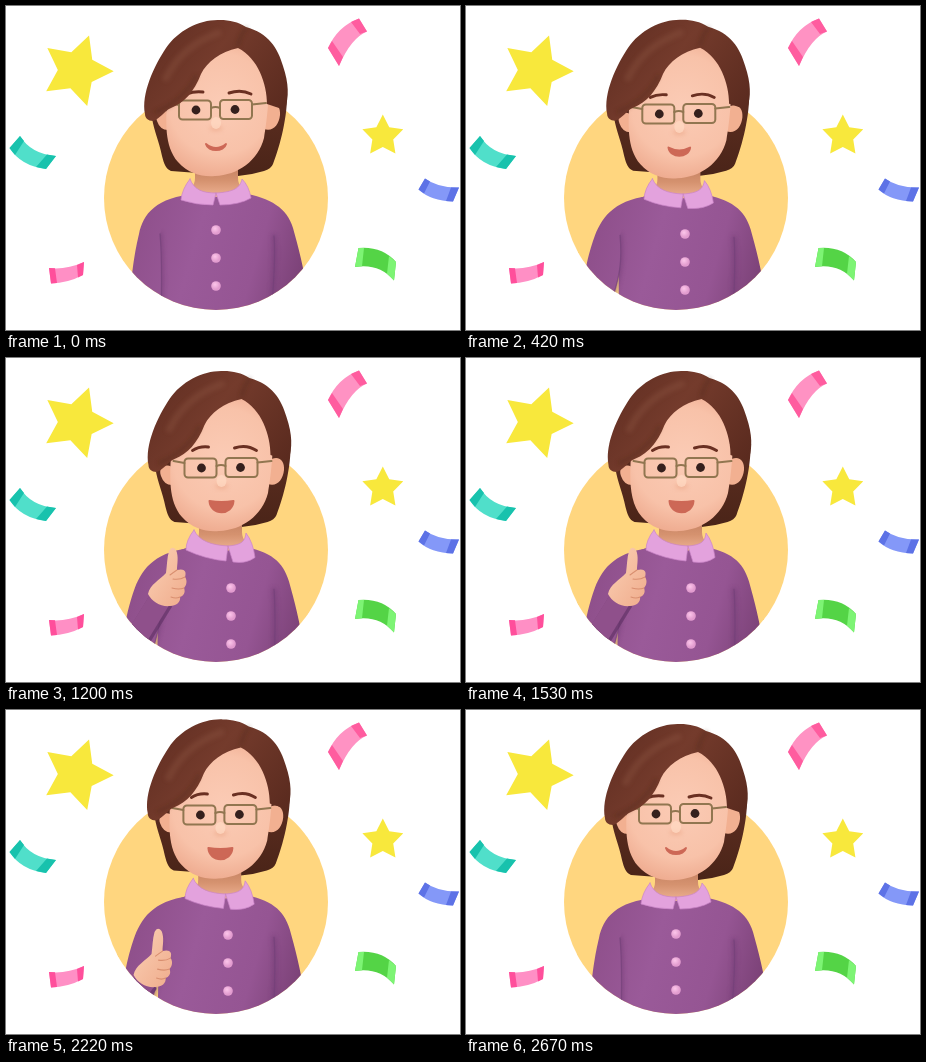
Write an HTML page that moves like this. It is 454 px wide and 324 px high and loops after 2700 ms.

```html
<!DOCTYPE html>
<html lang="en">
<head>
<meta charset="utf-8">
<title>Thumbs up</title>
<style>
  html, body { margin: 0; width: 100%; height: 100%; overflow: hidden; background: #fff; }
  svg { display: block; width: 100vw; height: 100vh; }
</style>
</head>
<body>
<svg viewBox="0 0 454 324" fill="none" stroke-linecap="round" stroke-linejoin="round">
  <defs>
    <clipPath id="disc"><circle cx="210" cy="192" r="112"/></clipPath>
    <filter id="soft" x="-50%" y="-50%" width="200%" height="200%"><feGaussianBlur stdDeviation="2.2"/></filter>
    <linearGradient id="shirt" gradientUnits="userSpaceOnUse" x1="125" y1="200" x2="298" y2="250">
      <stop stop-color="#8d4e89"/><stop offset=".4" stop-color="#9a5a99"/><stop offset=".75" stop-color="#955593"/><stop offset="1" stop-color="#7d4379"/>
    </linearGradient>
    <linearGradient id="hair" gradientUnits="userSpaceOnUse" x1="165" y1="30" x2="270" y2="110">
      <stop stop-color="#673225"/><stop offset=".35" stop-color="#743b2c"/><stop offset="1" stop-color="#5b2b1f"/>
    </linearGradient>
    <linearGradient id="backHair" x2="0" y2="1">
      <stop stop-color="#653224"/><stop offset="1" stop-color="#4a2418"/>
    </linearGradient>
    <radialGradient id="skin" gradientUnits="userSpaceOnUse" cx="214" cy="98" r="78">
      <stop stop-color="#fbcbb5"/><stop offset=".65" stop-color="#f8c2a9"/><stop offset="1" stop-color="#eda88c"/>
    </radialGradient>
    <linearGradient id="neckSkin" x2="0" y2="1">
      <stop stop-color="#b9765a"/><stop offset=".6" stop-color="#d5926f"/><stop offset="1" stop-color="#eeb293"/>
    </linearGradient>
    <linearGradient id="handSkin" x2="1" y2="1">
      <stop stop-color="#fbd0b5"/><stop offset="1" stop-color="#efac8c"/>
    </linearGradient>
    <radialGradient id="button" cx=".4" cy=".35">
      <stop stop-color="#fcc6ea"/><stop offset="1" stop-color="#e29ccf"/>
    </radialGradient>
  </defs>

  <g id="confetti"></g>
  <circle cx="210" cy="192" r="112" fill="#ffd67f"/>

  <g id="hairBack">
    <path fill="url(#backHair)" d="M150 90L262 60 281 85C282 110 274 140 267 158Q265 163 258 165 245 169 232 170L165 165C160 163 158 158 156 150 153 135 148 125 146 112Z"/>
  </g>

  <g clip-path="url(#disc)">
    <g id="body">
      <path id="torso" fill="url(#shirt)"/>
      <path id="armShade" stroke="#6f3a73" stroke-width="4" opacity=".55" filter="url(#soft)"/>
      <path id="arm" fill="url(#shirt)"/>
      <path id="crease" stroke="#74407a" stroke-width="1.3" opacity=".7"/>
    </g>
    <path id="neck" fill="url(#neckSkin)" d="M189 150H232V172Q232 178 236 182 228 191 211 191 194 191 185 182 189 178 189 172Z"/>
    <path id="collar" fill="#e3a2dd" stroke="#cb85c7" stroke-width=".7"/>
    <g id="buttons" fill="url(#button)">
      <circle cx="210" cy="224" r="4.8"/><circle cx="210" cy="252" r="4.8"/><circle cx="210" cy="280" r="4.8"/>
    </g>
    <path id="forearmShade" stroke="#633267" stroke-width="25" stroke-linecap="butt" opacity=".7"/>
    <path id="forearm" stroke="#8f508b" stroke-width="22" stroke-linecap="butt"/>
    <g id="hand">
      <path fill="url(#handSkin)" d="M160 215C161 207 161 200 163 193Q166 187 170 192C173 199 171 206 171 212 178 210 181 213 179 219 182 223 180 228 178 230 180 235 177 238 174 239 175 244 170 248 164 248 155 249 146 244 142 236 144 226 154 222 160 215Z"/>
      <path stroke="#d98f70" stroke-width="1.1" d="M164 217Q168 214 171 212M167 221Q174 222 179 219M166 230Q173 232 178 230M165 239Q170 241 174 239"/>
    </g>
  </g>

  <g id="face">
    <path fill="#f2b091" d="M162 106C154 102 148 107 151 115Q154 124 162 124ZM258 100C268 93 275 99 274 109 273 119 267 126 258 123Z"/>
    <path fill="url(#skin)" d="M161 92C160 115 158 140 172 156 183 168 196 171 209 170 232 169 252 155 258 132 261 115 265 80 262 55L240 30 215 35 185 60Z"/>
  </g>
  <g id="features">
    <path fill="#e9a282" opacity=".5" filter="url(#soft)" d="M203 123Q210 128 217 123L215 120H205Z"/>
    <ellipse cx="210" cy="117" rx="5" ry="6" fill="#ffd9c3" opacity=".75"/>
    <g fill="#35201d"><circle cx="190" cy="104" r="4.4"/><circle cx="229" cy="103.5" r="4.4"/></g>
    <path id="brows" stroke="#6a3022" stroke-width="2.9"/>
    <g stroke="#917650" stroke-width="2">
      <rect x="173" y="94.5" width="32" height="19" rx="3.5"/><rect x="214" y="94" width="32" height="19" rx="3.5"/>
      <path d="M205 102Q209.500 100 214 102M173 99L162 97M246 98.500L260 97"/>
    </g>
    <path id="mouth" fill="#cd6856" stroke="#cd6856" stroke-width="2"/>
  </g>
  <g id="hairFront">
    <path fill="url(#hair)" d="M139 108C135 88 148 60 160 42 172 24 195 13 214 14 224 14 232 16 240 21 262 27 272 42 277 60 283 78 283 90 279 104L261 98C261 78 252 52 232 42 214 46 201 56 195 68 188 86 178 97 165 102 158 105 154 113 147 115 142 115 139 112 139 108Z"/>
    <path stroke="#8a5240" stroke-width="7" opacity=".4" filter="url(#soft)" d="M160 72Q176 40 212 27"/>
    <path stroke="#4c2519" stroke-width="3" opacity=".4" filter="url(#soft)" d="M232 39Q235 28 240 22M150 106Q178 94 190 70"/>
  </g>
</svg>

<script>
const LOOP = 2700, STEP = 30;
const el = id => document.getElementById(id);
const draw = (id, d) => el(id).setAttribute('d', d);
const move = (id, x, y) => el(id).setAttribute('transform', `translate(${x} ${y})`);

function star(cx, cy, radius, turn) {
  const points = Array.from({ length: 10 }, (_, i) => {
    const a = (turn + i * 36) * Math.PI / 180, r = i % 2 ? radius * 0.51 : radius;
    return `${cx + r * Math.cos(a)},${cy + r * Math.sin(a)}`;
  });
  return `<polygon points="${points.join(' ')}" fill="#f8e83c"/>`;
}
const ribbon = (color, shape, endColor, ends) =>
  `<path fill="${color}" d="${shape}"/><path fill="${endColor}" d="${ends}"/>`;

el('confetti').innerHTML = star(70.7, 64.4, 37, 1.5) + star(376.8, 130, 21.5, -18) +
  ribbon('#ff92c3', 'M322 42Q332 20 353 12.500L361 25.500Q345 32 333 60Z',
    '#ff5c9f', 'M322 42L326 35 337 51 333 60ZM345 16L353 12.500 361 25.500 354 28Z') +
  ribbon('#50dfca', 'M14 130Q25 148 50 150L40 163Q15 160 3.500 142Z',
    '#18c2ad', 'M14 130L18 135 9 149 3.500 142ZM41 148.500L50 150 40 163 30 161Z') +
  ribbon('#8498f8', 'M419 172.500Q432 182 453 181.500L447 195.500Q425 195 412.500 183.500Z',
    '#5d72e6', 'M419 172.500L424 175.500 418 187.500 412.500 183.500ZM445 181.500L453 181.500 447 195.500 440 195Z') +
  ribbon('#54d446', 'M352.500 242Q376 240 390 256L388 274.500Q373 257 349 261Z',
    '#7df474', 'M352.500 242L358 242 356 260.300 349 261ZM383 250L390 256 388 274.500 381 267.800Z') +
  ribbon('#ff8fc5', 'M43 262Q60 264 78 256L77 269Q62 277 45 277.500Z',
    '#ff4f9b', 'M43 262L49 262.300 51 277 45 277.500ZM71 259L78 256 77 269 72 271.500Z');

// Smooth curve through [time, value] keys, flat at turning points.
function track(...keys) {
  const secant = i => keys[i] && keys[i + 1]
    ? (keys[i + 1][1] - keys[i][1]) / (keys[i + 1][0] - keys[i][0]) : 0;
  const slope = i => secant(i - 1) * secant(i) > 0 ? (secant(i - 1) + secant(i)) / 2 : 0;
  return t => {
    const i = keys.findIndex(k => k[0] > t) - 1;
    if (i === -1) return keys[0][1];
    if (i < 0) return keys.at(-1)[1];
    const [t0, a] = keys[i], [t1, b] = keys[i + 1], span = t1 - t0, u = (t - t0) / span;
    const ease = u * u * (3 - 2 * u);
    return a + (b - a) * ease + span * u * (1 - u) * (slope(i) * (1 - u) - slope(i + 1) * u);
  };
}
// findIndex gives -1 past the last key, so shift that case below the "before first key" one.
const yawAt = track([30, 0], [420, 0.6], [690, 1], [2100, 1], [2220, 0.8], [2430, 0.27], [2610, 0]);
const dropAt = track([30, 0], [420, 4], [690, 6], [2100, 6], [2220, 1], [2430, -5], [2610, 0]);
const elbowAt = track([30, 0], [400, 1], [2400, 1], [2610, 0]);
const smileAt = track([150, 0], [420, 0.4], [660, 1], [2220, 1], [2430, 0.35], [2580, 0]);
const raiseAt = track([430, 0], [690, 1], [2100, 1], [2220, 0.7], [2340, 0]);
const pumpAt = track([1200, 0], [1360, 1], [1530, 0]);

function render(t) {
  const yaw = yawAt(t), drop = dropAt(t), elbow = elbowAt(t), smile = smileAt(t);

  move('hairBack', 3.5 * yaw, drop - 7 * yaw);
  move('hairFront', 3.5 * yaw, drop - 7 * yaw);
  move('face', 4 * yaw, drop - 3 * yaw);
  move('features', 5.5 * yaw, drop);
  move('neck', 4 * yaw, drop - 4 * yaw);
  move('body', 0, drop - 4.5 * yaw);
  move('buttons', 15 * yaw, drop);

  const turn = 4 * yaw;
  draw('torso', `M186 187C165 191 152 205 153 235L${155 - turn} 300V330H${302 - turn}V290
    C${298 - turn} 262 ${292 - turn} 240 ${287 - turn} 222C${281 - turn} 202 265 192 236 187Z`);
  const inner = `C156 270 156 250 154 228`;
  draw('arm', `M190 188C150 191 137 208 ${133 - 4 * elbow} 228
    C${129 - 6 * elbow} 245 ${126 - 8 * elbow} 262 ${122 - 9 * elbow} 310
    L${155 - 16 * elbow} 310${inner}Q160 200 190 188Z`);
  const armEdge = `M${155 - 16 * elbow} 310${inner}`;
  const rightEdge = `M268 230Q270 255 ${265 + 3 * yaw} 310`;
  draw('armShade', armEdge + rightEdge);
  draw('crease', armEdge + rightEdge);

  const p = (x, y, dx, dy) => `${x + dx * yaw} ${y + drop + dy * yaw}`;
  draw('collar', `M${p(184, 173, 4, -7)}Q${p(176, 183, 4, -7)} ${p(175, 194, 5, -8)}
    Q${p(190, 199, 9, -4)} ${p(207, 199, 13, -2)}L${p(210, 187, 12, -5)}
    C${p(197, 187, 8, -6)} ${p(188, 184, 5, -7)} ${p(184, 173, 4, -7)}Z
    M${p(210, 187, 12, -5)}L${p(214, 199, 13, -1)}Q${p(233, 199, 7, 1)} ${p(245, 192, 4, 1.5)}
    Q${p(243, 180, 4, -2)} ${p(236, 173, 4, -4)}C${p(234, 182, 5, -4)} ${p(228, 186, 7, -5)} ${p(210, 187, 12, -5)}Z`);

  const brow = 3 * smile;
  draw('brows', `M181 ${88 - brow / 2}Q188 ${85 - brow} 197 ${86 - brow}
    M223 ${87 - brow}Q235 ${83 - brow} 245 ${88 - brow / 2}`);
  const lip = 138 - smile;
  draw('mouth', `M${200 - 2 * smile} ${lip}Q210 ${146 - 7 * smile} ${220 + 2 * smile} ${lip}
    C${218 + 3 * smile} ${146 + 6 * smile} ${202 - 3 * smile} ${146 + 6 * smile} ${200 - 2 * smile} ${lip}Z`);

  const lowered = 1 - raiseAt(t), pump = pumpAt(t);
  const hx = -56 * lowered + 26 * lowered * lowered - pump, hy = 97 * lowered + 4 * pump;
  move('hand', hx, hy);
  draw('forearm', `M${154 + hx} ${241 + hy}L124 290`);
  draw('forearmShade', `M${155.5 + hx} ${242 + hy}L125.5 291`);
}

function frame() {
  render(Math.floor(performance.now() % LOOP / STEP) * STEP);
  requestAnimationFrame(frame);
}
frame();
</script>
</body>
</html>
```
